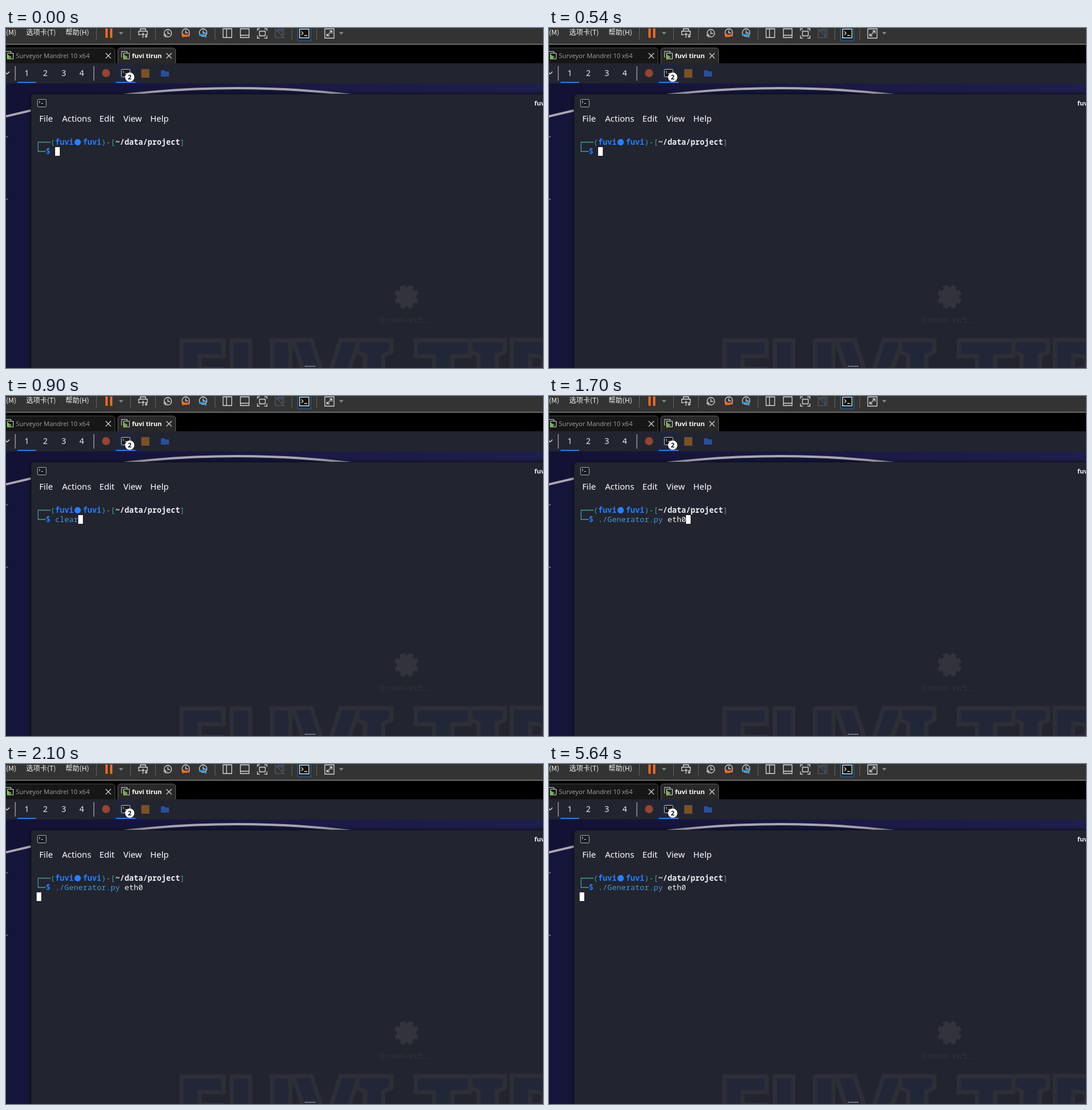
These frames come from a looping animation (929 px wide and 588 px high, 8000 ms). An HTML page:

```html
<!DOCTYPE html>
<html lang="en">
<head>
<meta charset="utf-8">
<title>Terminal session</title>
<style>
  html, body { margin: 0; width: 100%; height: 100%; overflow: hidden; background: #000; }
  svg { display: block; width: 929px; height: 588px; }
  text { white-space: pre; }
  .ui { font: 12px "Noto Sans CJK SC", "Noto Sans CJK", sans-serif; fill: #f4f4f4; }
  .tab { font: 11px "Open Sans", sans-serif; fill: #a0a0a0; }
  .tab.on { font-weight: 700; fill: #fff; }
  .panel { font: 14px "Noto Sans", sans-serif; fill: #e8e9ee; text-anchor: middle; }
  .badge { font: 700 11px "Noto Sans", sans-serif; fill: #111; text-anchor: middle; }
  .menu { font: 14.667px "Noto Sans", sans-serif; fill: #fff; }
  .title { font: 700 11px "Noto Sans", sans-serif; fill: #f0f0f2; }
  .ghost { font: 15px "Noto Sans", sans-serif; fill: #30313b; }
  .word { font: 900 160px "Noto Sans", sans-serif; fill: #222738; stroke: #2d2e37; stroke-width: 15; paint-order: stroke; }
  .mono { font: 13.333px "Noto Sans Mono", monospace; fill: #eef0f2; }
  .b { font-weight: 700; }
  .blue { fill: #277fff; }
  .teal { fill: #489b91; }
  .cmd { fill: #4597d3; }
  .line { fill: none; stroke: #d6d6d6; }
  .sep { stroke: #626262; }

  /* Hard cuts between the four terminal states */
  .step { visibility: hidden; animation: 8s step-end infinite; }
  .idle { animation-name: idle; }
  .clear { animation-name: clear; }
  .typed { animation-name: typed; }
  .caret { animation-name: caret; }
  .run { animation-name: run; }
  @keyframes idle { 0% { visibility: visible; } 11.25%, 100% { visibility: hidden; } }
  @keyframes clear { 0% { visibility: hidden; } 11.25% { visibility: visible; } 21.25%, 100% { visibility: hidden; } }
  @keyframes typed { 0% { visibility: hidden; } 21.25%, 100% { visibility: visible; } }
  @keyframes caret { 0% { visibility: hidden; } 21.25% { visibility: visible; } 26.25%, 100% { visibility: hidden; } }
  @keyframes run { 0% { visibility: hidden; } 26.25%, 100% { visibility: visible; } }
</style>
</head>
<body>
<svg width="929" height="588" viewBox="0 0 929 588">
  <defs>
    <linearGradient id="sky">
      <stop offset="0" stop-color="#121235"/>
      <stop offset=".65" stop-color="#1b1b46"/>
      <stop offset="1" stop-color="#1f1f4d"/>
    </linearGradient>
    <filter id="soft" x="-5%" y="-5%" width="110%" height="110%"><feGaussianBlur stdDeviation="3"/></filter>
    <g id="vm">
      <path class="line" d="M1 11V.5H10.500V3M4.500 13.500V3.500H14.500V13.500Z" stroke="#b5b5b5"/>
      <path d="M5 6L12 10.500L5 15Z" fill="#62b63c"/>
    </g>
    <g id="clock">
      <circle class="line" r="6.500" stroke-width="1.300"/>
      <path class="line" d="M0-4V.5H4" stroke-width="1.300"/>
    </g>
    <path id="close" class="line" d="M-4.500-4.500L4.500 4.500M4.500-4.500L-4.500 4.500" stroke-width="1.200"/>
    <path id="drop" d="M-4-2H4L0 2.500Z" fill="#858585"/>
    <rect id="cursor" width="8" height="15" fill="#fff"/>
  </defs>

  <!-- Desktop -->
  <rect y="96" width="929" height="492" fill="url(#sky)"/>
  <circle cx="400" cy="1771" r="1667" fill="#14153a" stroke="#a9a6b0" stroke-width="4"/>
  <text class="ui" x="0" y="189">.</text>
  <text class="ui" x="0" y="297">.</text>

  <!-- Toolbar -->
  <rect width="929" height="28" fill="#333"/>
  <rect y="27" width="929" height="2" fill="#686868"/>
  <text class="ui" x="0" y="12">(M)</text>
  <text class="ui" x="35" y="12">选项卡(T)</text>
  <text class="ui" x="103" y="12">帮助(H)</text>
  <path class="sep" d="M156.500 0V20M215.500 0V20M258.500 0V20M361.500 0V20M494.500 0V20M537.500 0V20"/>
  <path d="M172 1h4v16h-4zM180 1h4v16h-4z" fill="#f56a1e"/>
  <use href="#drop" x="199" y="9"/>
  <use href="#drop" x="580" y="9"/>
  <g class="line" stroke-width="1.300">
    <path d="M232.500 5.500V1.500H241.500V5.500M233 11.500H229.500V5.500H244.500V11.500H241M237 8V17M234 11H240M240 14.500H245M242.500 12V17"/>
    <use href="#clock" x="280" y="9"/>
    <use href="#clock" x="311" y="8"/>
    <use href="#clock" x="341" y="8"/>
    <path d="M375.500 1.500H390.500V16.500H375.500ZM381.500 1.500V16.500"/>
    <path d="M405.500 1.500H420.500V16.500H405.500ZM405.500 12.500H420.500"/>
    <path d="M435 5V1.500H439M447 1.500H451.500V5M451.500 13V17.500H447M439 17.500H435V13M438.500 5.500H448.500V13.500H438.500Z"/>
    <path d="M466 4.500H478V16.500H466ZM470 2H481V13M465 1L482 18" stroke="#4a5965"/>
    <path d="M551.500 1.500H567.500V17.500H551.500ZM555 13.500L564 5M559.500 5H564V9.500M555 9.500V13.500H559.500"/>
  </g>
  <path d="M272 13h7M275.500 9.500v7" stroke="#d6d6d6"/>
  <path d="M303 13l5-4v2.500h10v3h-10v2.500z" fill="#f56a1e"/>
  <path d="M334 12h10M344 9.500h3M344 15h3" fill="none" stroke="#2d9be0" stroke-width="3"/>
  <rect x="504.500" y="-2" width="23" height="24" fill="#1c2c3a" stroke="#276c9b"/>
  <rect x="508" y="2" width="16" height="15" fill="#111" stroke="#eee" stroke-width="1.300"/>
  <path class="line" d="M511 6l3 3-3 3M516 13h5" stroke-width="1.400"/>

  <!-- Machine tabs -->
  <rect y="29" width="929" height="32" fill="#000"/>
  <path d="M-1 61V34.500H185.500L188.500 37.500V61" fill="#171717" stroke="#454545"/>
  <path d="M193.500 61V37.500L196.500 34.500H290.500L293.500 37.500V61" fill="#282828" stroke="#5c5c5c"/>
  <use href="#vm" x="-2" y="40"/>
  <use href="#vm" x="199" y="40"/>
  <text class="tab" x="17" y="52">Surveyor Mandrel 10 x64</text>
  <text class="tab on" x="218" y="52">fuvi tirun</text>
  <use href="#close" x="177" y="48"/>
  <use href="#close" x="282" y="48"/>

  <!-- Desktop panel -->
  <rect y="61" width="929" height="35" fill="#22242f"/>
  <rect x="190" y="61" width="34" height="34" fill="#20263a"/>
  <path d="M20 94h32M190 94h34" stroke="#2878ef" stroke-width="2"/>
  <path class="line" d="M-2 75.500L2 79.500L6 75.500" stroke-width="1.500"/>
  <path d="M16 66V91M152 66V91" stroke="#777984" stroke-width="2"/>
  <g class="panel">
    <text x="36" y="83">1</text>
    <text x="68" y="83">2</text>
    <text x="100" y="83">3</text>
    <text x="131" y="83">4</text>
  </g>
  <circle cx="173" cy="78" r="7" fill="#934632"/>
  <rect x="199.500" y="71.500" width="15" height="13" rx="1" fill="#191b22" stroke="#c6c7cb"/>
  <path class="line" d="M202 74l2 2-2 2M206 78.500h3"/>
  <circle cx="214" cy="85" r="8" fill="#fff"/>
  <text class="badge" x="214" y="89">2</text>
  <rect x="234" y="71" width="14" height="15" fill="#7a5127"/>
  <path d="M268 73h6l1.500 2H282v9h-14z" fill="#284f9a"/>

  <!-- Terminal window -->
  <rect x="43" y="114" width="900" height="490" rx="5" fill="#05060d" opacity=".6" filter="url(#soft)"/>
  <path d="M43.500 590V119.500Q43.500 114.500 48.500 114.500H930V590Z" fill="#22242f" stroke="#15161d"/>
  <text class="word" x="293" y="658">FUVI TIRUN</text>
  <g transform="translate(693 465) rotate(9.600)" fill="#32333d">
    <circle r="17"/>
    <circle r="17" fill="none" stroke="#32333d" stroke-width="8" pathLength="16" stroke-dasharray="1.150 .85"/>
  </g>
  <text class="ghost" x="645" y="510">Brolan-Vu5...</text>
  <path d="M517 585h18" stroke="#9899a0" stroke-width="2" stroke-dasharray="2 1.200"/>
  <rect x="54.500" y="123.500" width="15" height="13" rx="1" fill="#191b22" stroke="#a9aab0"/>
  <path class="line" d="M57 126l2 2-2 2M61 130.500h3"/>
  <text class="title" x="914" y="134">fuvi</text>
  <g class="menu">
    <text x="57.500" y="162">File</text>
    <text x="97" y="162">Actions</text>
    <text x="161.500" y="162">Edit</text>
    <text x="203" y="162">View</text>
    <text x="249.500" y="162">Help</text>
  </g>

  <!-- Prompt -->
  <path d="M77 197.500H55.500V213.500H69" fill="none" stroke="#489b91" stroke-width="1.300"/>
  <g class="mono">
    <text class="teal" x="77" y="202">(</text>
    <text class="blue b" x="85" y="202">fuvi</text>
    <circle class="blue" cx="124" cy="197.500" r="5.500"/>
    <text class="blue b" x="133" y="202">fuvi</text>
    <text class="teal" x="165" y="202">)-[</text>
    <text class="b" x="189" y="202">~/data/project</text>
    <text class="teal" x="301" y="202">]</text>
    <text class="blue b" x="69" y="218">$</text>
    <text class="cmd step clear" x="85" y="218">clear</text>
    <g class="step typed">
      <text class="cmd" x="85" y="218">./Generator.py</text>
      <text x="205" y="218">eth0</text>
    </g>
  </g>
  <use class="step idle" href="#cursor" x="85" y="206"/>
  <use class="step clear" href="#cursor" x="125" y="206"/>
  <use class="step caret" href="#cursor" x="237" y="206"/>
  <use class="step run" href="#cursor" x="53" y="222"/>
</svg>
</body>
</html>
```
